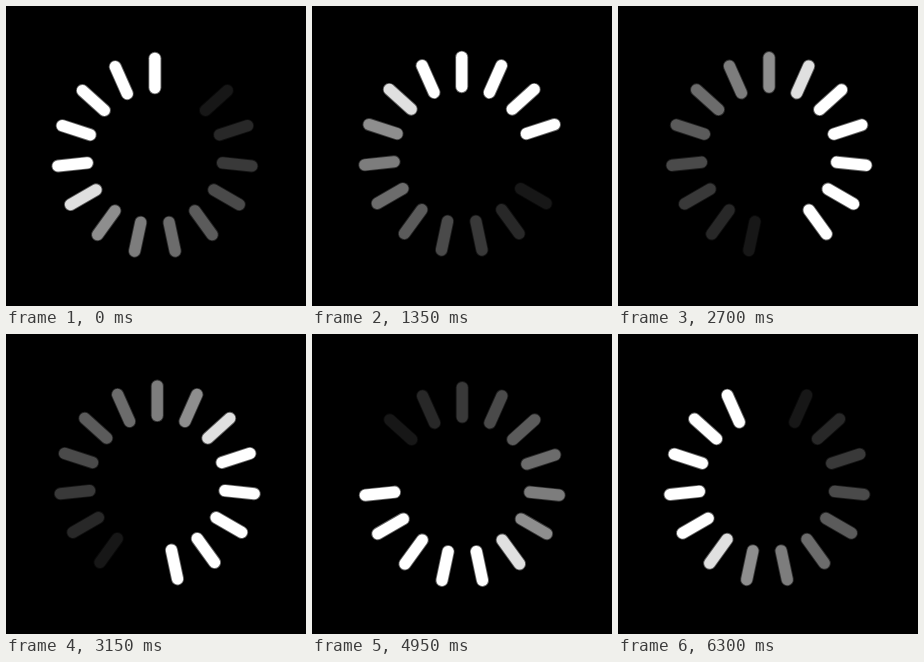
Recreate the animation shown at these times as an HTML page with a canvas. Size 300 by 300 pixels, loop 6.75 s.

```html
<!DOCTYPE html>
<html lang="en">
<head>
<meta charset="utf-8">
<title>Spinner</title>
<style>
  html, body { margin: 0; width: 100%; height: 100%; overflow: hidden; background: #000; }
  canvas { display: block; width: 100vmin; height: 100vmin; }
</style>
</head>
<body>
<canvas id="stage" width="300" height="300"></canvas>
<script>
const ctx = document.getElementById('stage').getContext('2d');
const SPOKES = 15;
const STEP_MS = 450;
const TURN = 2 * Math.PI / SPOKES;
const INNER = 68, OUTER = 97.5;
const WOBBLE = 1.2;

// Grey level by the number of steps since the head passed.
function shade(age) {
  if (age < 5) return 255;
  if (age === 5) return 224;
  return 142 - 17 * (age - 6);
}

function strokeSpoke(width, alpha) {
  ctx.globalAlpha = alpha;
  ctx.lineWidth = width;
  ctx.stroke();
}

function drawSpoke(cx, cy, index, level) {
  const sin = Math.sin(index * TURN), cos = Math.cos(index * TURN);
  ctx.strokeStyle = `rgb(${level},${level},${level})`;
  ctx.beginPath();
  ctx.moveTo(cx + INNER * sin, cy - INNER * cos);
  ctx.lineTo(cx + OUTER * sin, cy - OUTER * cos);
  strokeSpoke(13, 0.4);
  strokeSpoke(11.2, 1);
}

function draw(step) {
  ctx.globalAlpha = 1;
  ctx.fillStyle = '#000';
  ctx.fillRect(0, 0, 300, 300);
  ctx.lineCap = 'round';

  // The ring turns about a point slightly off its own centre.
  const cx = 150.1 - WOBBLE * Math.cos(step * TURN);
  const cy = 149.8 - WOBBLE * Math.sin(step * TURN);

  for (let age = 0; age < SPOKES - 1; age++) {
    drawSpoke(cx, cy, step - age, shade(age));
  }
}

const start = performance.now();
let shown = -1;

function tick() {
  const step = Math.floor((performance.now() - start) / STEP_MS) % SPOKES;
  if (step !== shown) draw(shown = step);
  requestAnimationFrame(tick);
}
tick();
</script>
</body>
</html>
```
